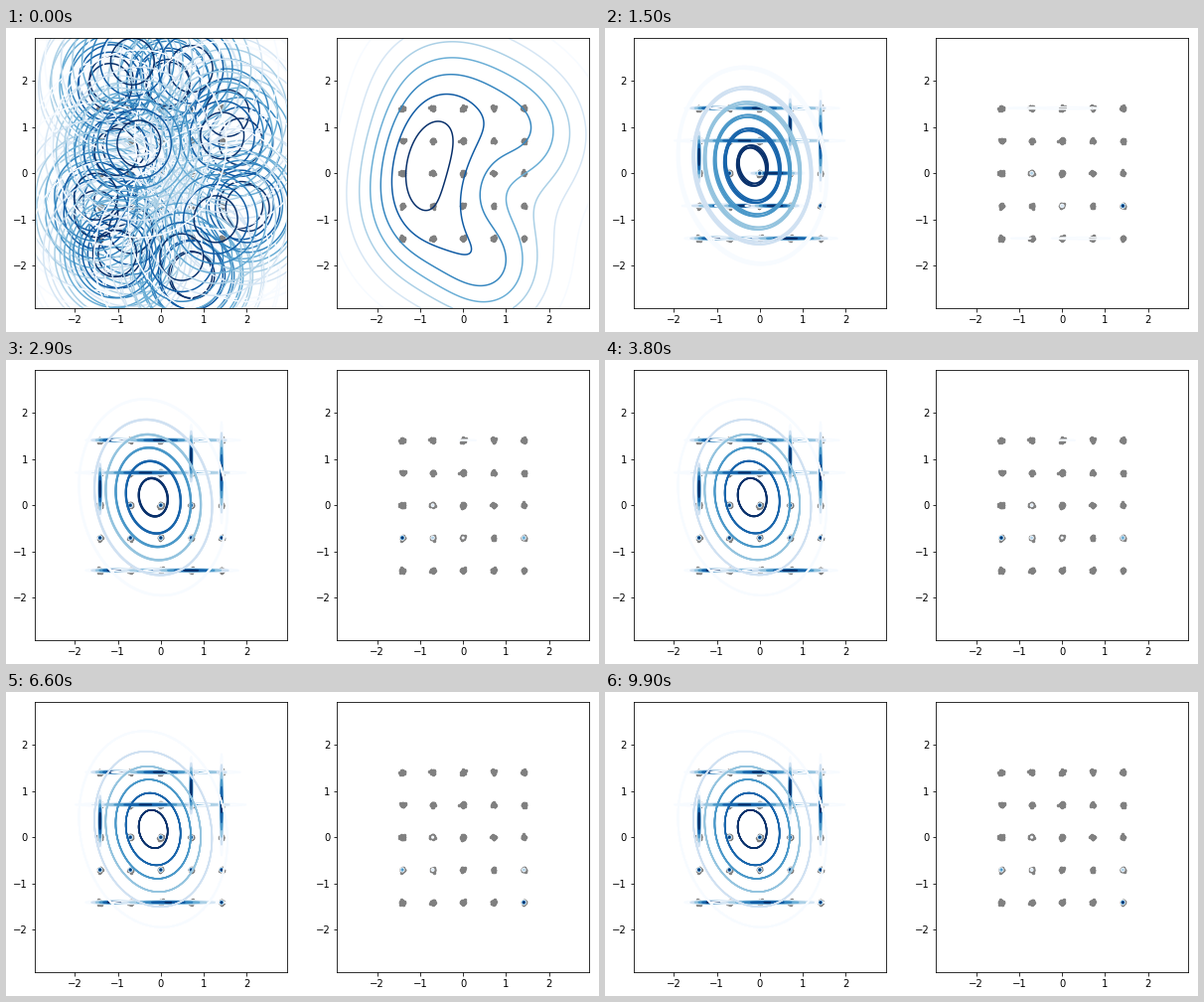
Animation of 597x306 px, one loop 10 s. Source, as a matplotlib script:

```python
import numpy as np
import matplotlib.pyplot as plt
from matplotlib.animation import FuncAnimation
from matplotlib.collections import LineCollection
from matplotlib.ticker import MaxNLocator

W, H, DPI = 597, 306, 72
FRAMES, STEP = 100, 100
LIM = 2.932
U = 0.5 ** 0.5          # spacing of the point lattice
S = 0.022               # spread of one lattice cluster

rng = np.random.default_rng(4)
lattice = np.array([(i, j) for i in range(-2, 3) for j in range(-2, 3)]) * U
points = np.repeat(lattice, 40, axis=0)
points = points + rng.normal(0, S, points.shape)

axis = np.linspace(-LIM, LIM, 401)
theta = np.linspace(0, 2 * np.pi, 91)
locator = MaxNLocator(8, min_n_ticks=1)

# starting neighbourhoods: x, y, total weight
HUBS = [(0.3, 2.2, 1.4), (-1.4, -0.5, 2.0), (-1.1, 2.2, 1.4), (-0.8, -1.5, 1.4),
        (0.5, -2.05, 2.9), (1.6, 0.95, 2.6), (1.8, -0.85, 0.4), (-0.6, 0.55, 3.0)]
# lattice cells covered at the end: row j from i0 to i1, column i from j0 to j1
ROWS = [(2, -2, -1), (2, -1, 2), (2, -1, 1), (1, -2, 2), (1, -2, 1),
        (-2, -2, -1), (-2, -1, 1.5)]
COLS = [(-2, 0, 1), (1, 1, 2), (2, 0, 2)]
# single cells from heavy to light, with the time they let go of their row
SPOTS = [(2, -2, 50), (-2, -1, 20), (2, -1, 6), (-1, -1, 20), (-1, 0, 6),
         (0, -1, 6), (1, -1, 20), (1, 0, 20), (0, 0, 6)]
BROAD = 5


def block(i0, i1, j0, j1, w):
    """Mean, spread and weight of a Gaussian fitted to a block of cells."""
    def spread(a, b):
        return max(S, U * np.sqrt(((b - a + 1) ** 2 - 1) / 12))
    return np.array([(i0 + i1) * U / 2, (j0 + j1) * U / 2,
                     spread(i0, i1), spread(j0, j1), w])


def line_weight(k, a, b):
    return (0.06 if abs(k) == 2 else 0.02) * (b - a + 1)


def row(j, a, b):
    return block(a, b, j, j, line_weight(j, a, b))


def col(i, a, b):
    return block(i, i, a, b, line_weight(i, a, b))


parts = []


def add(first, last=None, release=0, edge=False, tilt=0):
    x, y, w = HUBS[len(parts) % len(HUBS)]
    start = np.array([x, y]) + rng.normal(0, 0.2, 2)
    parts.append(dict(start=start, w0=w / 3, first=first,
                      last=first if last is None else last,
                      release=release, shrink=7.5 if edge else 15, tilt=tilt))


for k, a, b in ROWS:
    add(row(k, a, b), edge=abs(k) == 2)
for k, a, b in COLS:
    add(col(k, a, b), edge=k == 2)
for rank, (i, j, release) in enumerate(SPOTS):
    add(row(j, min(i, 0), max(i, 0)), block(i, i, j, j, 0.15 * 0.65 ** rank),
        release, edge=j == -2)
for _ in range(BROAD):
    add(block(-2, 1.5, -2, 2.5, 0.1), tilt=-0.12)


def unit(u):
    return min(max(u, 0), 1)


def pose(part, t):
    """x, y, sx, sy, weight; sizes and weights blend geometrically."""
    c = unit((t - part["release"]) / 7)
    c = c * c * (3 - 2 * c)
    a, b = part["first"], part["last"]
    place = a[:2] + c * (b[:2] - a[:2])
    scale = a[2:] ** (1 - c) * b[2:] ** c

    travel = 1 - (1 - unit(t / 7)) ** 2
    shrink = unit(t / part["shrink"]) ** 2
    drift = part["start"] * 0.08 * np.exp(-t / 12) if part["tilt"] else 0
    place = part["start"] + travel * (place + drift - part["start"])
    weight = part["w0"] ** (1 - travel) * scale[2] ** travel
    return [*place, *scale[:2] ** shrink, weight]


def inner_levels(peak):
    ticks = locator.tick_values(0, peak)
    return ticks[(ticks > 0) & (ticks < peak)]


def rings(x, y, sx, sy, tilt):
    peak = 1 / (2 * np.pi * sx * sy)
    levels = inner_levels(peak)
    c = np.cos(theta)
    s = tilt * c + np.sqrt(1 - tilt ** 2) * np.sin(theta)
    radii = np.sqrt(2 * np.log(peak / levels))
    curves = [np.column_stack([x + r * sx * c, y + r * sy * s]) for r in radii]
    return curves, plt.cm.Blues(np.linspace(0, 1, len(levels)))


def bell(mean, sigma):
    z = (axis - mean[:, None]) / sigma[:, None]
    return np.exp(-z ** 2 / 2) / (sigma[:, None] * np.sqrt(2 * np.pi))


plt.rcParams["font.family"] = "DejaVu Sans"
fig = plt.figure(figsize=(W / DPI, H / DPI), dpi=DPI, facecolor="white")


def panel(left):
    ax = fig.add_axes([left / W, 1 - 282.1 / H, 253.64 / W, 271.8 / H])
    ax.scatter(*points.T, s=6, color="gray", zorder=1)
    ax.set(xlim=(-LIM, LIM), ylim=(-LIM, LIM),
           xticks=range(-2, 3), yticks=range(-2, 3))
    ax.autoscale(False)
    return ax


ax_parts, ax_mix = panel(29), panel(333.36)
outlines = LineCollection([], linewidths=1.5, zorder=2)
ax_parts.add_collection(outlines, autolim=False)
mix = None


def update(t):
    global mix
    states = np.array([pose(part, t) for part in parts])
    curves, colors = [], []
    for (x, y, sx, sy, _), part in zip(states, parts):
        segs, cols = rings(x, y, sx, sy, part["tilt"] * unit(t / 15))
        curves += segs
        colors += list(cols)
    outlines.set_segments(curves)
    outlines.set_color(colors)

    x, y, sx, sy, w = states.T
    z = bell(y, sy).T @ (w[:, None] * bell(x, sx))
    if mix is not None:
        mix.remove()
    mix = ax_mix.contour(axis, axis, z, levels=inner_levels(z.max()),
                         cmap="Blues", linewidths=1.5, zorder=2)
    return outlines, mix


anim = FuncAnimation(fig, update, frames=FRAMES, interval=STEP,
                     repeat=True, repeat_delay=0, blit=False)
plt.show()
```
